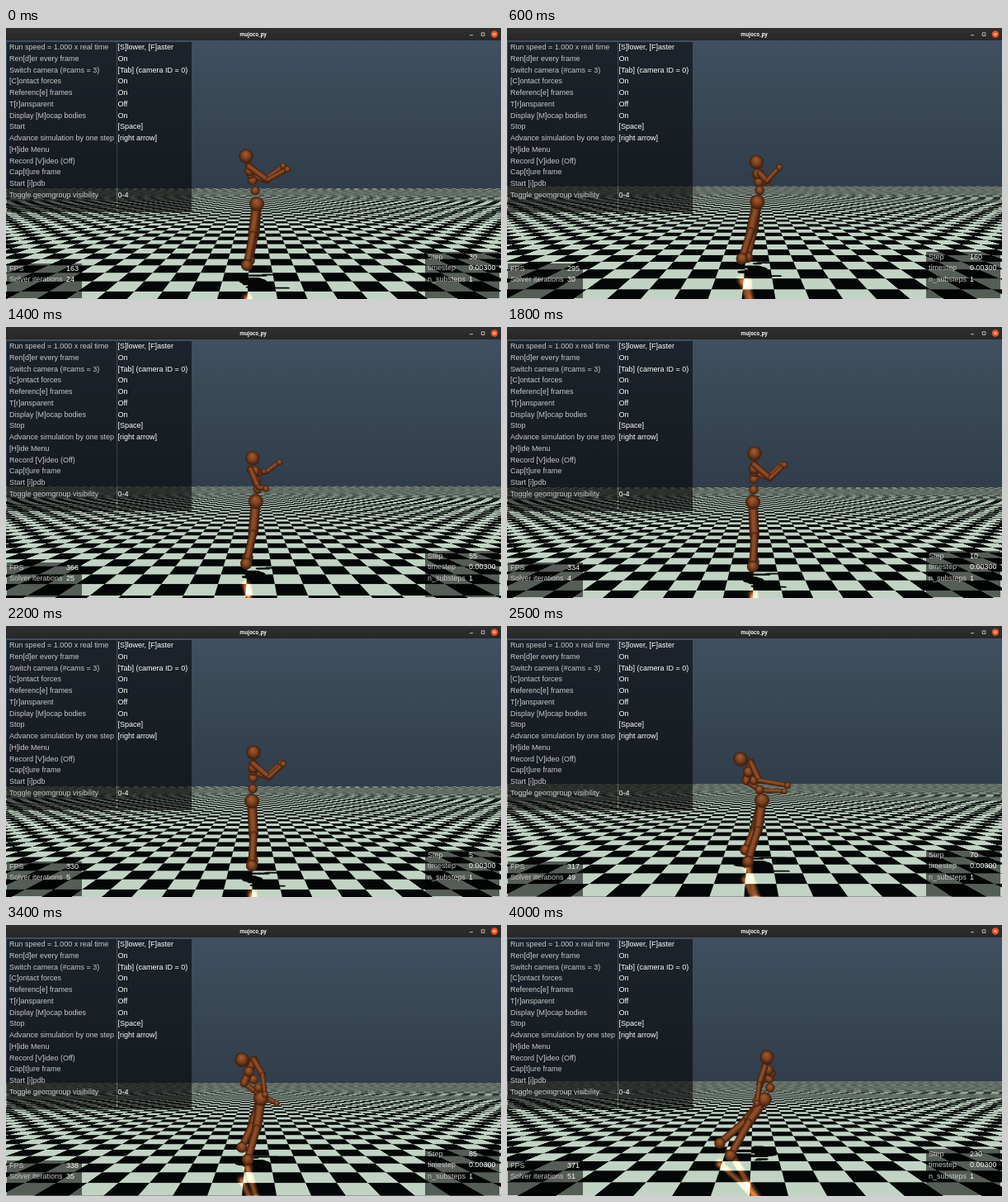
These frames come from a looping animation (600 by 328 pixels, 4100 ms). An HTML page with a canvas:

```html
<!DOCTYPE html>
<html lang="en">
<head>
<meta charset="utf-8">
<title>mujoco_py</title>
<style>
html, body { margin: 0; width: 100%; height: 100%; overflow: hidden; background: #000; }
#stage { position: absolute; left: 0; top: 0; width: 600px; height: 328px; overflow: hidden; }
canvas { position: absolute; left: 0; top: 0; }
#bar { position: absolute; left: 0; top: 0; width: 600px; height: 15px; background: linear-gradient(#303030, #272727); }
#bar b { position: absolute; left: 0; width: 599px; top: 0; text-align: center;
  font: bold 6.2px/15px "Open Sans", "Noto Sans", sans-serif; color: #f2f2f2; }
#bar svg { position: absolute; right: 0; top: 0; }
.panel { position: absolute; background: rgba(0, 0, 0, .56); white-space: pre;
  font: 9px/13.75px "Liberation Sans", Arial, sans-serif; color: #c9c9c9; padding-left: 3px; box-sizing: border-box; }
.value { color: #fff; padding-left: 1px; }
</style>
</head>
<body>
<div id="stage">
  <canvas id="view" width="600" height="328"></canvas>
  <div id="bar"><b>mujoco_py</b>
    <svg width="50" height="15" fill="none" stroke="#ddd" stroke-width=".8">
      <path d="M12 8.7h4M26.3 5.8h3.6v3.6h-3.6z"/>
      <circle cx="42" cy="7.5" r="4.2" fill="#e95420" stroke="none"/>
      <path d="M40.5 6l3 3m0-3l-3 3" stroke="#fff"/>
    </svg>
  </div>
</div>
<script>
const W = 600, H = 328, CX = 300, CY = 171.5, FOCAL = 378, CELL = 1 / 3, PX = FOCAL / 4;
const FRAME = 100, FRAMES = 41;
const stage = document.getElementById('stage');
const ctx = document.getElementById('view').getContext('2d');

// Each pose: camera height, then x,y of the joints listed here.
const JOINTS = ['head', 'waist', 'hip', 'kneeN', 'footN', 'kneeF', 'footF', 'elbowN', 'handN', 'elbowF', 'handF', 'twist'];
const POSES = {
  rest:  [1.43, 300,153, 299,197, 298,212, 300,253, 298,290, 300,250, 299,284, 319,183, 336,167, 316,182, 333,166, 0,-5],
  sway:  [1.43, 291,155, 302,197, 304,213, 299,250, 292,287, 302,249, 295,281, 317,184, 341,171, 313,184, 336,167, -1,-5],
  tuck:  [1.175, 310,167, 309,196, 303,209, 293,243, 280,274, 297,243, 289,275, 314,186, 323,167, 300,186, 303,202, 5,2],
  back:  [1.24, 283,161, 306,198, 309,211, 304,247, 292,285, 300,246, 289,271, 306,187, 340,193, 308,199, 336,200, 3,-11],
  reach: [1.24, 297,167, 314,195, 310,210, 298,245, 281,281, 301,243, 284,271, 286,210, 284,239, 318,163, 329,160, -12,3],
  twist: [1.24, 286,163, 306,197, 309,210, 304,246, 293,284, 298,243, 286,269, 311,181, 314,205, 303,202, 328,216, 6,-14],
  fall:  [1.11, 315,160, 319,197, 312,211, 293,239, 271,279, 288,238, 258,264, 306,192, 303,216, 309,190, 301,213, -4,-4]
};

// Frame index, pose, step, frames per second, solver iterations.
const KEYS = [
  [0, 'sway', 30, 163, 24], [10, 'tuck', 245, 374, 31], [11, 'tuck', 265, 372, 40],
  [12, 'rest', 10, 352, 6], [17, 'reach', 125, 366, 47],
  [18, 'rest', 10, 334, 4], [21, 'back', 75, 341, 44],
  [22, 'rest', 5, 330, 5], [25, 'back', 70, 317, 49], [29, 'reach', 125, 390, 48],
  [30, 'rest', 5, 352, 6], [34, 'twist', 85, 338, 35], [40, 'fall', 230, 371, 51]
];

const lerp = (a, b, k) => a + (b - a) * k;
const mix = (p, q, k) => ({ x: lerp(p.x, q.x, k), y: lerp(p.y, q.y, k) });
const noise = n => { const s = Math.sin(n * 91.7) * 4375.5; return s - Math.floor(s) - .5; };

function stateAt(frame) {
  let i = KEYS.length - 1;
  while (KEYS[i][0] > frame) i--;
  const a = KEYS[i], b = KEYS[i + 1] || a;
  const k = a === b ? 0 : (frame - a[0]) / (b[0] - a[0]);
  const nums = POSES[a[1]].map((v, n) => lerp(v, POSES[b[1]][n], k));
  const pose = {};
  JOINTS.forEach((name, n) => pose[name] = { x: nums[1 + 2 * n], y: nums[2 + 2 * n] });
  const { head, waist, twist } = pose;
  pose.chest = mix(head, waist, .42);
  pose.belly = mix(head, waist, .7);
  pose.armN = { x: pose.chest.x + twist.x, y: pose.chest.y + twist.y };
  pose.armF = { x: pose.chest.x - twist.x, y: pose.chest.y - twist.y };
  const jitter = k ? noise(frame) : 0;
  return {
    pose, height: nums[0],
    camX: (CX - (pose.footN.x + pose.footF.x) / 2) / PX,
    step: 5 * Math.round(lerp(a[2], b[2], k) / 5),
    fps: Math.round(lerp(a[3], b[3], k) + 24 * jitter),
    iter: Math.round(lerp(a[4], b[4], k) + 8 * jitter)
  };
}

// Box-filtered square wave of period 2.
const ramp = u => { const m = u - 2 * Math.floor(u / 2); return m < 1 ? m : 2 - m; };
const wave = (u, w) => (ramp(u + w / 2) - ramp(u - w / 2)) / w;

const TOP = 184;
const floor = document.createElement('canvas');
floor.width = W; floor.height = H - TOP;
const floorCtx = floor.getContext('2d');
const pixels = floorCtx.createImageData(W, H - TOP);
const LIGHT = [193, 212, 196], DARK = [4, 7, 7];

function drawFloor(height, camX) {
  const reach = FOCAL * height, edge = CY + reach / 24, data = pixels.data;
  for (let y = TOP, p = 0; y < H; y++) {
    const cover = Math.max(0, Math.min(1, y + 1 - edge));
    const near = reach / (y + 1 - CY), far = Math.min(24, reach / (y - CY));
    const d = (near + far) / 2;
    const rows = cover ? wave((d - 4) / CELL, Math.max(.01, far - near) / CELL) : 0;
    for (let x = 0; x < W; x++, p += 4) {
      const t = .5 + .5 * rows * wave((camX + (x + .5 - CX) * d / FOCAL) / CELL, d / FOCAL / CELL);
      for (let c = 0; c < 3; c++) data[p + c] = lerp(DARK[c], LIGHT[c], t);
      data[p + 3] = 255 * cover;
    }
  }
  floorCtx.putImageData(pixels, 0, 0);
  ctx.drawImage(floor, 0, TOP);
}

function line(a, b, width, color, dx = 0, dy = 0) {
  ctx.strokeStyle = color;
  ctx.lineWidth = width;
  ctx.beginPath();
  ctx.moveTo(a.x + dx, a.y + dy);
  ctx.lineTo(b.x + dx, b.y + dy);
  ctx.stroke();
}

function limb(a, b, width) {
  line(a, b, width, '#41200f');
  line(a, b, width * .76, '#68361a', -.2, -.4);
  line(a, b, width * .4, '#8c4c26', -.3, -.7);
}

function ball(p, r) {
  const g = ctx.createRadialGradient(p.x - r * .1, p.y - r * .4, 0, p.x, p.y, r);
  g.addColorStop(0, '#a85c30');
  g.addColorStop(.5, '#7f4320');
  g.addColorStop(1, '#3a1c0c');
  ctx.fillStyle = g;
  ctx.beginPath();
  ctx.arc(p.x, p.y, r, 0, 7);
  ctx.fill();
}

function drawBody(p) {
  limb(p.armF, p.elbowF, 7); limb(p.elbowF, p.handF, 5.6); ball(p.handF, 3.6);
  limb(p.hip, p.kneeF, 11); limb(p.kneeF, p.footF, 9); ball(p.footF, 6.8);
  ball(p.waist, 5.7); ball(p.belly, 5.9);
  limb(p.armN, p.armF, 10); ball(p.chest, 6.6);
  limb(p.hip, p.kneeN, 11.6); limb(p.kneeN, p.footN, 9.4); ball(p.footN, 7.2);
  ball(p.hip, 9); ball(p.head, 8.7);
  limb(p.armN, p.elbowN, 7.8); limb(p.elbowN, p.handN, 6); ball(p.handN, 4);
}

function drawShadow(p, ground) {
  const squash = .31;
  const at = (q, depth) => ({ x: q.x, y: depth / squash });
  const cast = (a, b, width, depth) => line(at(a, depth), at(b, depth), width, '#050707');
  ctx.save();
  ctx.translate(0, ground);
  ctx.scale(1, squash);
  cast(p.head, p.chest, 17, 0); cast(p.chest, p.hip, 24, 0);
  cast(p.hip, p.footN, 11, 3); cast(p.hip, p.footF, 11, -3);
  cast(p.armF, p.elbowF, 7, -7); cast(p.elbowF, p.handF, 6, -8);
  cast(p.armN, p.elbowN, 8, 7); cast(p.elbowN, p.handN, 6, 8);
  ctx.restore();
}

function drawReflection(p, ground) {
  ctx.save();
  ctx.beginPath();
  ctx.rect(0, ground - 14, W, H);
  ctx.clip();
  ctx.globalCompositeOperation = 'lighter';
  ctx.globalAlpha = .4;
  ctx.translate(0, 2 * ground);
  ctx.scale(1, -1);
  drawBody(p);
  ctx.restore();
}

function drawScene({ pose, height, camX }) {
  const ground = CY + PX * height;
  const sky = ctx.createLinearGradient(0, 15, 0, 195);
  sky.addColorStop(0, '#405060');
  sky.addColorStop(1, '#303d4a');
  ctx.fillStyle = sky;
  ctx.fillRect(0, 0, W, H);
  ctx.lineCap = 'round';
  drawFloor(height, camX);
  drawShadow(pose, ground);
  drawReflection(pose, ground);
  drawBody(pose);
}

function panel(x, y, w, h, value) {
  const el = document.createElement('div');
  el.className = value ? 'panel value' : 'panel';
  Object.assign(el.style, { left: x + 'px', top: y + 'px', width: w + 'px', height: h + 'px' });
  stage.append(el);
  return el;
}

const menu = panel(1, 17, 133, 206);
const keys = panel(134.5, 17, 90.5, 206, true);
const statNames = panel(1, 284.5, 70.5, 42);
const stats = panel(72, 284.5, 20, 42, true);
const simNames = panel(508, 270.5, 51.5, 56);
const sim = panel(560, 270.5, 38, 56, true);
keys.textContent = ['[S]lower, [F]aster', 'On', '[Tab] (camera ID = 0)', 'On', 'On', 'Off', 'On',
  '[Space]', '[right arrow]', '', '', '', '', '0-4'].join('\n');
statNames.textContent = 'FPS\nSolver iterations';
simNames.textContent = 'Step\ntimestep\nn_substeps';

const menuText = toggle => ['Run speed = 1.000 x real time', 'Ren[d]er every frame', 'Switch camera (#cams = 3)',
  '[C]ontact forces', 'Referenc[e] frames', 'T[r]ansparent', 'Display [M]ocap bodies', toggle,
  'Advance simulation by one step', '[H]ide Menu', 'Record [V]ideo (Off)', 'Cap[t]ure frame',
  'Start [i]pdb', 'Toggle geomgroup visibility'].join('\n');

let shown = -1;
function show(frame) {
  if (frame === shown) return;
  shown = frame;
  const state = stateAt(frame);
  drawScene(state);
  menu.textContent = menuText(frame ? 'Stop' : 'Start');
  stats.textContent = state.fps + '\n' + state.iter;
  sim.textContent = state.step + '\n0.00300\n1';
}

const start = performance.now();
function tick() {
  show(Math.floor((performance.now() - start) / FRAME) % FRAMES);
  requestAnimationFrame(tick);
}
show(0);
tick();
</script>
</body>
</html>
```
